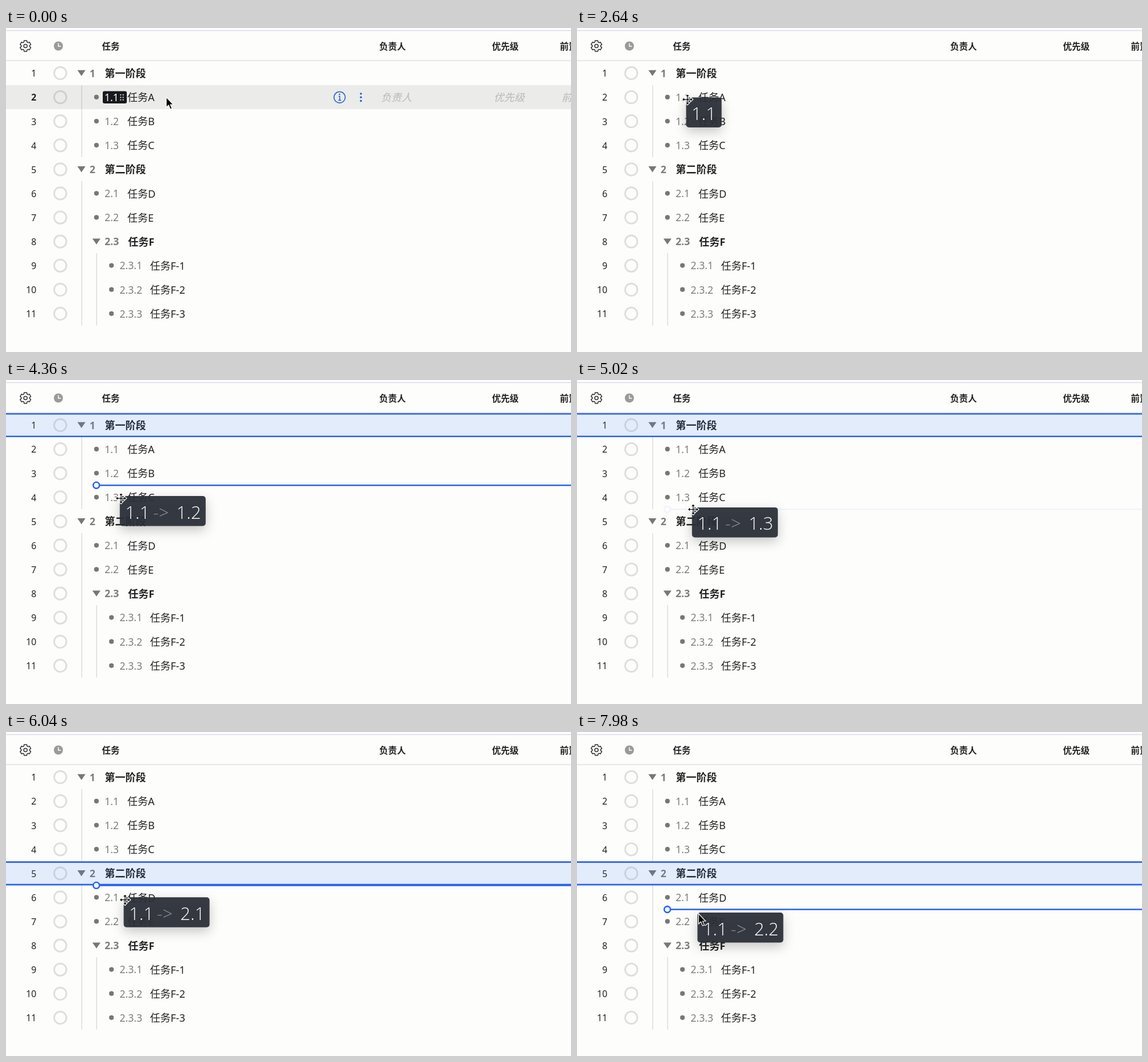
Recreate the animation shown at these times as an HTML page. Size 987 by 567 pixels, loop 8000 ms.

```html
<!DOCTYPE html>
<html lang="zh">
<head>
<meta charset="utf-8">
<title>任务拖拽排序</title>
<style>
  html, body { margin: 0; width: 100%; height: 100%; overflow: hidden; background: #fdfdfc; }
  svg { display: block; width: 987px; height: 567px; }
  text { font-family: "Noto Sans", "Noto Sans CJK SC", "Noto Sans CJK", sans-serif; fill: #222; white-space: pre; }
  .head { font-size: 15.5px; font-weight: 600; }
  .idx { font-size: 15.8px; text-anchor: end; }
  .no { font-size: 17.6px; fill: #7c7c7c; }
  .name { font-size: 18px; }
  .bold { font-weight: 700; }
  .hint { font-size: 18px; font-style: italic; fill: #b9b9b9; }
  .guide { stroke: #dadada; stroke-width: 1.4; }
  .ring { fill: none; stroke: #dedede; stroke-width: 2.9; }
  .mark { fill: #777; }
  .blue { stroke: #2962f5; stroke-width: 2.6; fill: none; }
  #tip text { font-family: "Open Sans", "Noto Sans", sans-serif; font-size: 31px; font-weight: 300; fill: #fff; }
  #tip .arrow { fill: #8b8e94; }
  #tip rect { fill: #2b2f38; fill-opacity: .94; filter: drop-shadow(0 7px 10px rgba(0,0,0,.24)); }
</style>
</head>
<body>
<svg viewBox="0 0 987 567">
  <path d="M0 4.5H987" stroke="#dcdcee" stroke-width="1.3"/>
  <path d="M0 57H987" stroke="#e0e0e0" stroke-width="1.3"/>
  <g fill="none" stroke="#333" stroke-width="1.5" stroke-linejoin="round">
    <path id="gear"/>
    <circle cx="34" cy="31.5" r="3"/>
  </g>
  <circle cx="91.5" cy="31.5" r="8" fill="#9a9a9a"/>
  <path d="M91.5 26.5V32H96" fill="none" stroke="#fff" stroke-width="1.5"/>
  <text class="head" x="167.5" y="37.5">任务</text>
  <text class="head" x="652" y="37.5">负责人</text>
  <text class="head" x="849" y="37.5">优先级</text>
  <text class="head" x="967.5" y="37.5">前置任务</text>
  <path class="guide" d="M132.3 100V226M132.3 268V521M158.4 394V521"/>
  <g id="rings"></g>
  <rect id="shade" x="0" y="100" width="987" height="42" fill="#000" fill-opacity=".07"/>
  <g id="rows"></g>
  <g id="hover">
    <rect x="169" y="110.5" width="42" height="21.5" rx="3" fill="#17191c"/>
    <text class="no" x="172" y="127.7" style="fill:#fff">1.1</text>
    <g id="grip" fill="#c8c8c8"></g>
    <circle cx="582.8" cy="121.3" r="9.8" fill="none" stroke="#2360cf" stroke-width="1.6"/>
    <path d="M581 119.5H583V126.5M580.5 126.5H585.5" fill="none" stroke="#2360cf" stroke-width="1.5"/>
    <g fill="#2360cf">
      <circle cx="582.7" cy="116" r="1.3"/>
      <circle cx="620" cy="115" r="1.8"/>
      <circle cx="620" cy="121.3" r="1.8"/>
      <circle cx="620" cy="127.6" r="1.8"/>
    </g>
    <text class="hint" x="655" y="128">负责人</text>
    <text class="hint" x="852" y="128">优先级</text>
    <text class="hint" x="970.5" y="128">前置任务</text>
  </g>
  <g id="parent">
    <rect x="0" y="59" width="987" height="40" fill="#2f74f0" fill-opacity=".12"/>
    <path class="blue" d="M0 59.2H987M0 98.7H987"/>
  </g>
  <g id="drop">
    <path class="blue" d="M163 0H987"/>
    <circle class="blue" cx="157.8" cy="0" r="5.4" style="fill:#fff"/>
  </g>
  <g id="tip">
    <rect id="box" height="52.5" rx="5"/>
    <text x="9.5" y="39.5">1.1</text>
    <g id="goal">
      <text class="arrow" x="58" y="39.5">-&gt;</text>
      <text id="to" x="99" y="39.5"></text>
    </g>
  </g>
  <g id="pointer">
    <path id="arrow" d="M0 0V17.8L4.1 14L7 21L10 19.8L7.1 13H12.3Z" fill="#000" stroke="#fff" stroke-width="1.2"/>
    <path id="move" fill="#000" stroke="#fff" stroke-width="1.2" stroke-linejoin="round"/>
  </g>
</svg>
<script>
const $ = id => document.getElementById(id);
const TOP = 57.9, PITCH = 42.1, LOOP = 8000;

// Number, name, nesting depth, has children
const tasks = [
  ['1', '第一阶段', 0, 1], ['1.1', '任务A', 1], ['1.2', '任务B', 1], ['1.3', '任务C', 1],
  ['2', '第二阶段', 0, 1], ['2.1', '任务D', 1], ['2.2', '任务E', 1], ['2.3', '任务F', 1, 1],
  ['2.3.1', '任务F-1', 2], ['2.3.2', '任务F-2', 2], ['2.3.3', '任务F-3', 2]
];
const nameX = [172.5, 212, 251.5];

let rings = '', rows = '';
tasks.forEach(([no, name, depth, open], i) => {
  const y = 79 + PITCH * i, x = 131.8 + 26.2 * depth, bold = open ? ' bold' : '';
  rings += `<circle class="ring" cx="94.8" cy="${y}" r="10.7"/>`;
  rows += `<text class="idx" x="53" y="${y + 6.3}">${i + 1}</text>`
    + (open ? `<path class="mark" d="M${x - 7} ${y - 5.3}h14l-7 10.4z"/>`
            : `<circle class="mark" cx="${x}" cy="${y - .2}" r="4.1"/>`)
    + `<text class="no${bold}" x="${x + 14.2}" y="${y + 6.6}">${no}</text>`
    + `<text class="name${bold}" x="${nameX[depth] + (open && depth ? 1.3 : 0)}" y="${y + 7}">${name}</text>`;
});
$('rings').innerHTML = rings;
$('rows').innerHTML = rows;
const hoverIdx = document.querySelectorAll('.idx')[1];

let dots = '';
for (let i = 0; i < 6; i++)
  dots += `<circle cx="${200.3 + i % 2 * 4.4}" cy="${117 + (i >> 1) * 4.4}" r="1.2"/>`;
$('grip').innerHTML = dots;

// Six teeth, four corners each
let gear = '';
for (let i = 0; i < 24; i++) {
  const tooth = (i >> 2) * 60 - 90, k = i % 4;
  const a = (tooth + [-23, -14, 14, 23][k]) * Math.PI / 180, r = k === 1 || k === 2 ? 9.7 : 7.3;
  gear += (i ? 'L' : 'M') + (34 + r * Math.cos(a)).toFixed(2) + ' ' + (31.5 + r * Math.sin(a)).toFixed(2);
}
$('gear').setAttribute('d', gear + 'Z');

// One arm of the four-way arrow, turned by quarter steps
const arm = [[-1.2, -1.2], [-1.2, -5.2], [-4.2, -5.2], [0, -9.8], [4.2, -5.2], [1.2, -5.2]];
const turn = ([x, y], n) => n ? turn([-y, x], n - 1) : [x, y];
$('move').setAttribute('d', 'M' + [0, 1, 2, 3].map(n => arm.map(p => turn(p, n).join(' ')).join('L')).join('L') + 'Z');

// Pointer path: time, x, y, x speed, y speed (px per ms)
const path = [
  [0, 280, 121, 0, 0], [150, 280, 121, 0, 0], [1300, 190, 121, 0, 0], [2250, 190, 121, 0, 0],
  [2640, 193, 125, .007, .035], [3340, 197, 148, .005, .08], [4360, 201, 207, .004, .04],
  [5580, 205, 261, .005, .1], [6700, 212, 317, .004, .035], [6800, 212.4, 318, 0, 0], [LOOP, 212.4, 318, 0, 0]
];

function at(t) {
  let i = 0;
  while (i < path.length - 2 && t >= path[i + 1][0]) i++;
  const a = path[i], b = path[i + 1], d = b[0] - a[0], u = Math.max(0, (t - a[0]) / d);
  const v = u * u * (3 - 2 * u), p = u * (1 - u) * (1 - u) * d, q = u * u * (u - 1) * d;
  return [1, 2].map(k => a[k] + (b[k] - a[k]) * v + a[k + 2] * p + b[k + 2] * q);
}

const rowAt = t => Math.floor((at(t)[1] - TOP) / PITCH);
const entered = [];
for (let t = 0; t < LOOP; t += 5) entered[rowAt(t)] ??= t;

const DRAG = 2350, LAG = 50, FADE = 110;
const goals = { 3: '1.2', 4: '1.3', 5: '2.1', 6: '2.2' };
const show = (id, on) => { $(id).style.display = on ? '' : 'none'; };
const place = (id, x, y) => $(id).setAttribute('transform', `translate(${x.toFixed(2)} ${y.toFixed(2)})`);

function draw(t) {
  const [x, y] = at(t), row = rowAt(t), drag = t >= DRAG, over = drag && row > 1;
  const grab = x < 211;
  place('pointer', x, y);
  show('arrow', !grab);
  show('move', grab);
  show('shade', !drag);
  show('hover', !drag);
  hoverIdx.style.fontWeight = drag ? 400 : 700;

  show('parent', over);
  show('drop', over);
  if (over) {
    place('parent', 0, row > 4 ? 4 * PITCH : 0);
    place('drop', 0, TOP + PITCH * row);
    $('drop').style.opacity = Math.min(1, (t - entered[row]) / FADE);
  }

  show('tip', drag);
  if (drag) {
    const [tx, ty] = at(t - LAG), goal = goals[row];
    place('tip', tx - 2, ty - 2);
    $('box').setAttribute('width', goal ? 150 : 62);
    show('goal', goal);
    $('to').textContent = goal || '';
  }
}

const start = performance.now();
function tick(now) {
  draw(Math.max(0, now - start) % LOOP);
  requestAnimationFrame(tick);
}
draw(0);
requestAnimationFrame(tick);
</script>
</body>
</html>
```
